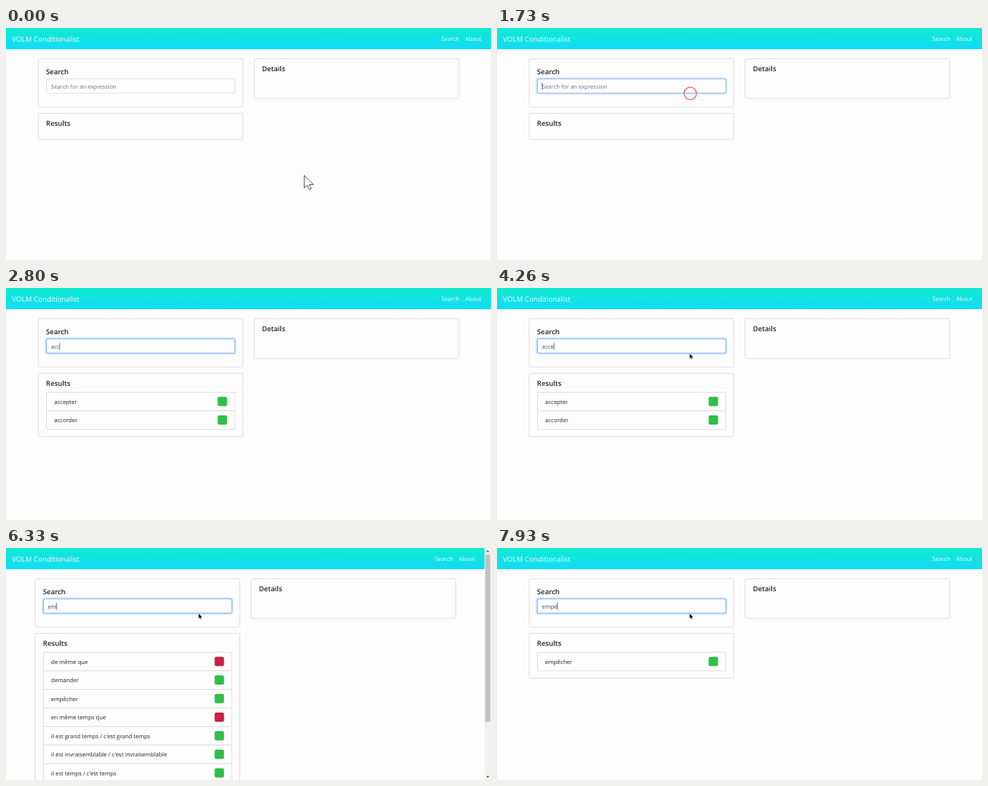
Write an HTML page that moves like this. It is 640 px wide and 306 px high and loops after 8 s.

```html
<!DOCTYPE html>
<html lang="en">
<head>
<meta charset="utf-8">
<title>VOLM Conditionalist</title>
<style>
html, body { margin: 0; width: 100%; height: 100%; overflow: hidden; background: #fdfdfd; }
svg { display: block; font: 7.5px "Open Sans", "Noto Sans", sans-serif; fill: #212529; text-rendering: geometricPrecision; }
.box { fill: #fdfdfd; stroke: #dfdfdf; }
.head { font-size: 9.2px; font-weight: 600; }
.nav { fill: #fff; fill-opacity: .93; }
</style>
</head>
<body>
<svg id="stage" width="640" height="306" viewBox="0 0 640 306">
  <defs>
    <linearGradient id="sea" x2="0" y2="1">
      <stop stop-color="#11ead0"/><stop offset="1" stop-color="#12dcf6"/>
    </linearGradient>
  </defs>
  <g id="page"></g>
</svg>
<script>
const LOOP = 8000, BLINK = 530, FOCUS = 1600;
const G = '#2fbe46', Y = '#f8ca10', R = '#ca2142';
const page = document.getElementById('page');

const accepter = ['accepter', G], accorder = ['accorder', G], prevent = ['empêcher', G];
const meanwhile = ['en même temps que', R];
const highTime = ["il est grand temps / c'est grand temps", G], time = ["il est temps / c'est temps", G];
const common = [accepter, accorder, ['à condition que', G], ['afin que', G], ['aimer', G], ['ainsi que', R], ['alors que', R]];
const none = { rows: [], n: 0 };
const list = (rows, n = rows.length) => ({ rows, n });

// what the field holds, from each time on
const keys = [
  [0, ''], [FOCUS, ''], [2130, 'a'], [2400, 'ac'], [2670, 'acc'], [4260, 'acce'], [4600, 'accep'],
  [5400, 'acce'], [5530, 'acc'], [5660, 'ac'], [5860, 'a'], [6000, ''], [6130, 'e'], [6260, 'em'],
  [7000, 'emp'], [7600, 'empe']
];
const two = list([accepter, accorder]);
const five = list([accepter, accorder, ['de façon que', Y], ['être fâché', G], ["il est exact / c'est exact", Y]]);
const results = [
  [0, none], [2260, list(common, 45)], [2530, five], [2800, two], [4400, list([accepter])],
  [5660, two], [5800, five], [5930, list(common, 45)], [6200, list(common, 60)],
  [6320, list([['de même que', R], ['demander', G], prevent, meanwhile, highTime,
    ["il est invraisemblable / c'est invraisemblable", G], time], 10)],
  [7200, list([prevent, meanwhile, highTime, time])], [7800, list([prevent])]
];
const at = (track, t) => track.filter(k => k[0] <= t).pop();

const rect = (x, y, w, h, attr = 'class="box"') =>
  `<rect x="${x}" y="${y}" width="${w}" height="${h}" ${attr}/>`;
const text = (x, y, s, attr = '') => `<text x="${x}" y="${y}" ${attr}>${s}</text>`;
const card = (x, y, h) => rect(x, y, 270, h, 'class="box" rx="1.5"');
const arrow = (x, y, scale, attr) =>
  `<path transform="translate(${x} ${y}) scale(${scale})" d="M0 0v16.5l4-3.7 2.7 6 2.7-1.2-2.7-5.6h5.6z" ${attr}/>`;

function scrollbar(n) {
  const thumb = 289 * 306 / (155.5 + 24.5 * n);
  return rect(631.5, 0, 8.5, 306, 'fill="#f1f1f1"') + rect(632.5, 8.5, 6.5, thumb, 'fill="#c1c1c1"') +
    '<path d="M633.7 5.3l2-2.2 2 2.2zM633.7 300.7l2 2.2 2-2.2z" fill="#505050"/>';
}

function field(t, value) {
  const f = Math.max(0, Math.min(1, (t - FOCUS) / 150));
  return rect(52.2, 66.2, 250.6, 20.6, `rx="3" fill="none" stroke="#007bff" stroke-width="1.6" stroke-opacity="${.25 * f}"`) +
    rect(53.5, 67, 248.5, 19, 'class="box" rx="2"') +
    rect(53.5, 67, 248.5, 19, `rx="2" fill="none" stroke="#80bdff" stroke-opacity="${f}"`) +
    text(59.3, 79.8, value || 'Search for an expression', `id="value" fill="${value ? '#495057' : '#6c757d'}"`);
}

function row([label, color], i) {
  const y = 137.5 + 24.5 * i;
  return rect(53.5, y, 248.5, 24.5) + text(63.6, y + 15.1, label) +
    rect(279.3, y + 5.9, 12.4, 12.4, `rx="2" fill="${color}"`);
}

function pointer(t) {
  if (t < 1260) {
    const u = Math.max(0, (t - 600) / 660), e = u * u * (3 - 2 * u);
    return arrow(393.5 - 138.5 * e, 194.5 - 108.5 * e, 1, 'fill="#fff" stroke="#444" stroke-width=".9"');
  }
  if (t >= FOCUS && t < 1860) return '<circle cx="255" cy="86.3" r="8.2" fill="none" stroke="#e2505f" stroke-width="1.1"/>';
  return t >= 3600 ? arrow(254.3, 86.7, .38, 'fill="#000"') : '';
}

function draw(t) {
  const [pressed, value] = at(keys, t), { rows, n } = at(results, t)[1];
  const long = n > 6;
  const caret = t >= FOCUS && (t - pressed) % (2 * BLINK) < BLINK;
  page.innerHTML =
    rect(0, 0, 640, 28, 'fill="url(#sea)"') +
    text(8, 18, 'VOLM Conditionalist', 'class="nav" font-size="9.4"') +
    `<g transform="translate(${long ? -8.5 : 0})">` +
      text(574.5, 17.4, 'Search', 'class="nav"') + text(606, 17.4, 'About', 'class="nav"') + '</g>' +
    `<g transform="translate(${long ? -4 : 0})">` +
      card(42.5, 40.5, 63.5) + card(327.5, 40.5, 52.5) + card(42.5, 112.5, 34.5 + 24.5 * n) +
      text(52.8, 60.5, 'Search', 'class="head"') + text(337.8, 56.5, 'Details', 'class="head"') +
      text(52.8, 128.8, 'Results', 'class="head"') +
      field(t, value) + rows.map(row).join('') +
      (caret ? rect(0, 72.3, .8, 9.2, 'id="caret" fill="#495057"') : '') + '</g>' +
    (long ? scrollbar(n) : '') + pointer(t);
  if (caret) {
    const width = value ? document.getElementById('value').getComputedTextLength() : 0;
    document.getElementById('caret').setAttribute('x', 59.2 + width);
  }
}

const start = performance.now();
function tick() {
  draw((performance.now() - start) % LOOP);
  requestAnimationFrame(tick);
}
tick();
</script>
</body>
</html>
```
